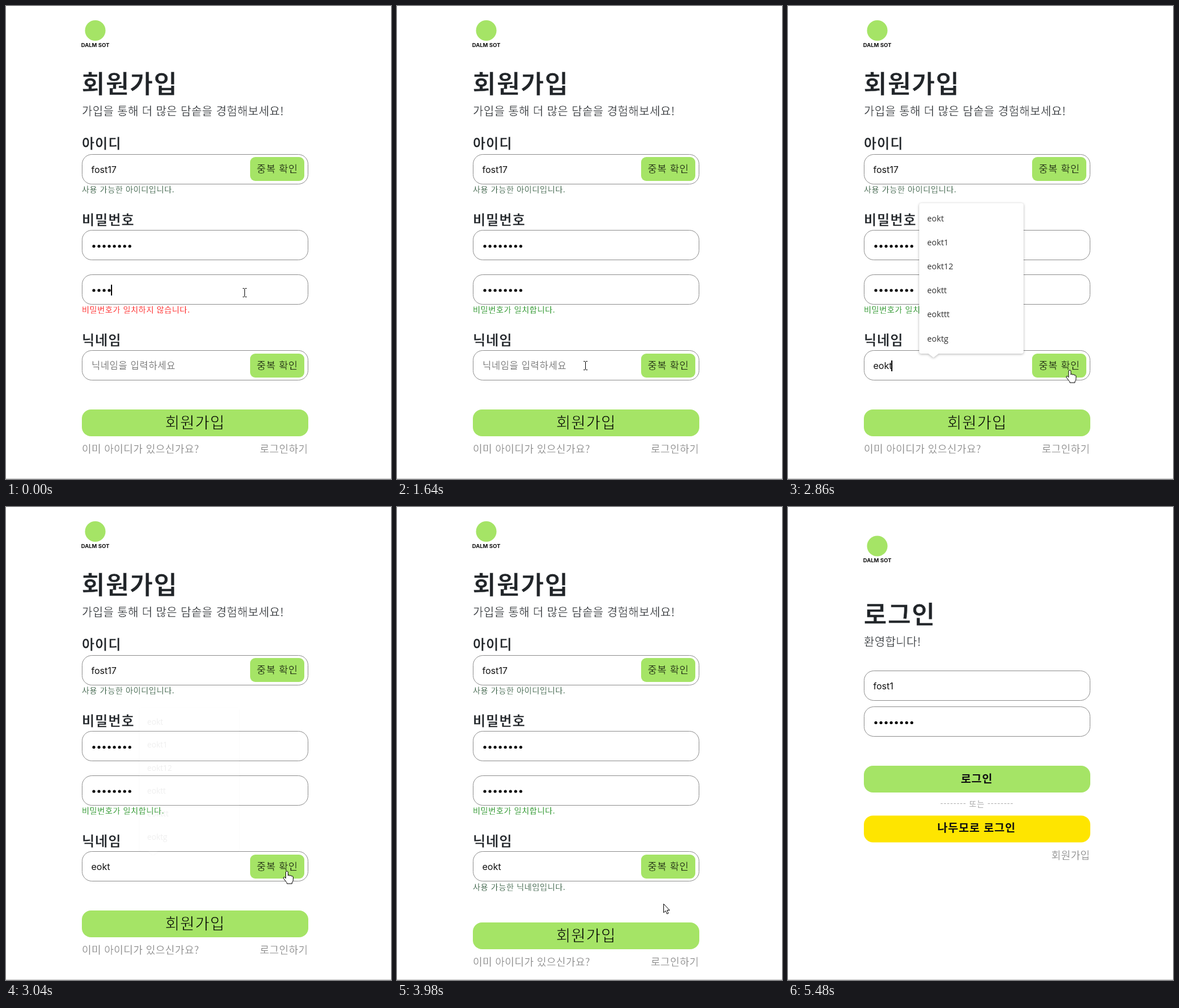
Write an HTML page that moves like this. It is 675x830 px and loops after 5680 ms.

```html
<!DOCTYPE html>
<html lang="ko">
<head>
<meta charset="utf-8">
<title>회원가입</title>
<style>
  html, body { margin: 0; width: 100%; height: 100%; overflow: hidden; background: #fff; }
  svg { display: block; width: 675px; height: 830px; }
  text { font-family: "Noto Sans CJK KR", "Noto Sans CJK JP", sans-serif; fill: #212529; }
  /* A stroke in the background colour thins the glyphs to a lighter weight. */
  .title, .label, .lead, .note, .hint, .link { stroke: #fff; stroke-width: .4px; }
  .check, .join { stroke: #a5e466; stroke-width: .4px; }
  .title { font-size: 44.5px; font-weight: 700; letter-spacing: 1.2px; stroke-width: .6px; }
  .lead { font-size: 20px; font-weight: 300; letter-spacing: .3px; }
  .label { font-size: 24px; font-weight: 700; letter-spacing: 1px; }
  .box { fill: #fff; stroke: #8c8c8c; }
  .green { fill: #a5e466; }
  .yellow { fill: #fee500; }
  .check { font-size: 17.5px; letter-spacing: .6px; fill: #000; }
  .value { font-family: Inter, "Noto Sans", sans-serif; font-size: 16px; fill: #111; }
  .hint { font-size: 16.5px; font-weight: 300; letter-spacing: .6px; fill: #757575; stroke-width: .2px; }
  .note { font-size: 14.2px; font-weight: 300; letter-spacing: .5px; fill: #1e4a2c; stroke-width: .25px; }
  .join { font-size: 27.5px; letter-spacing: 1px; fill: #000; stroke-width: .7px; }
  .link { font-size: 18px; font-weight: 300; letter-spacing: .35px; fill: #888; stroke-width: .25px; }
  .enter { font-size: 19.5px; font-weight: 600; letter-spacing: .8px; fill: #111; }
  .or { font-size: 14px; font-weight: 300; letter-spacing: .85px; fill: #aaa; }
  .brand { font-family: Inter, sans-serif; font-size: 9.5px; font-weight: 700; fill: #111; }
  .mid { text-anchor: middle; }
  .end { text-anchor: end; }
  .dots { fill: none; stroke: #000; stroke-width: 5.2; stroke-linecap: round; stroke-dasharray: 0 9; }
  .caret { fill: #000; }
  #popup { transform-origin: 321.5px 478px; }
  #popup path { fill: #fff; filter: drop-shadow(0 1px 2px rgba(0, 0, 0, .3)); }
  #popup text { font-family: "Open Sans", "Noto Sans", sans-serif; font-size: 14.3px; fill: #333; }
  #cursor path { fill: #fff; stroke: #000; stroke-linejoin: round; }
  #cursor #ibeam { fill: none; }
</style>
</head>
<body>
<svg viewBox="0 0 675 830">
  <defs>
    <rect id="field" class="box" x="133.5" width="396" height="52" rx="17"/>
    <rect id="bar" x="133" width="397" height="47" rx="16"/>
    <g id="check">
      <rect class="green" x="428" width="95" height="42" rx="9"/>
      <text class="check" x="439.5" y="27">중복 확인</text>
    </g>
    <g id="logo">
      <circle class="green" cx="156.5" cy="43" r="18"/>
      <text class="brand mid" x="156.5" y="71.5">DALM SOT</text>
    </g>
  </defs>

  <g id="signup">
    <use href="#logo"/>
    <text class="title" x="132.5" y="153">회원가입</text>
    <text class="lead" x="133" y="192">가입을 통해 더 많은 담솥을 경험해보세요!</text>

    <text class="label" x="133" y="250">아이디</text>
    <use href="#field" y="260.5"/>
    <text class="value" x="149.5" y="292.5">fost17</text>
    <use href="#check" y="265"/>
    <text class="note" x="133" y="327">사용 가능한 아이디입니다.</text>

    <text class="label" x="133" y="384">비밀번호</text>
    <use href="#field" y="393.5"/>
    <path class="dots" d="M154 421.5h63.1"/>
    <use href="#field" y="471.5"/>
    <path class="dots" id="repeat"/>
    <rect class="caret" id="pwCaret" y="489" width="2" height="19"/>
    <text class="note" id="match" x="133" y="538"></text>

    <text class="label" x="133" y="595">닉네임</text>
    <use href="#field" y="604.5"/>
    <text class="hint" id="hint" x="150" y="637.2">닉네임을 입력하세요</text>
    <text class="value" id="nick" x="149.5" y="637"></text>
    <rect class="caret" id="nickCaret" y="622" width="2" height="19"/>
    <use href="#check" y="610"/>
    <text class="note" id="nickOk" x="133" y="671.5">사용 가능한 닉네임입니다.</text>

    <g id="foot">
      <use href="#bar" class="green" y="708"/>
      <text class="join mid" x="331.5" y="741">회원가입</text>
      <text class="link" x="133" y="784.4">이미 아이디가 있으신가요?</text>
      <text class="link end" x="529.5" y="784.4">로그인하기</text>
    </g>

    <g id="popup">
      <path d="M234 346H409a4 4 0 0 1 4 4V606a4 4 0 0 1-4 4H264l-9 7-9-7H234a4 4 0 0 1-4-4V350a4 4 0 0 1 4-4Z"/>
    </g>
  </g>

  <g id="login">
    <use href="#logo" y="25.5"/>
    <text class="title" x="132.5" y="205">로그인</text>
    <text class="lead" x="133" y="243.7">환영합니다!</text>
    <use href="#field" y="287.5"/>
    <text class="value" x="149.5" y="319.5">fost1</text>
    <use href="#field" y="350.5"/>
    <path class="dots" d="M154 378.5h63.1"/>
    <use href="#bar" class="green" y="454"/>
    <text class="enter mid" x="331" y="484.4">로그인</text>
    <text class="or mid" x="331.3" y="525.8">-------- 또는 --------</text>
    <use href="#bar" class="yellow" y="541.4"/>
    <text class="enter mid" x="330.5" y="570.4">나두모로 로그인</text>
    <text class="link end" x="529.5" y="617.6">회원가입</text>
  </g>

  <g id="cursor">
    <path id="ibeam" d="M-3.5-7.5h2.5l1 1 1-1h2.5M0-6.5V6.5M-3.5 7.5h2.5l1-1 1 1h2.5"/>
    <path id="arrow" d="M.5.5V15.8L4 12.6 6.3 18 8.8 17 6.5 11.6H11Z"/>
    <path id="hand" d="M-2 2Q-2 0 0 0T2 2V8Q2 6.8 3.6 6.8T5.2 8.4Q5.4 7.6 6.8 7.6T8.4 9.2Q8.8 8.6 9.8 8.8T11 11V15Q11 18 9 20V22H0V20.5L-5 14Q-7 11.5-5.5 10.6T-2 12.5Z"/>
  </g>

  <path d="M0 829.5H675" stroke="#c4c4c4"/>
</svg>
<script>
  const LOOP = 5680;
  const $ = id => document.getElementById(id);
  const show = (id, on) => { $(id).style.display = on ? '' : 'none'; };

  // Each track holds [start ms, ...values]; the latest started entry applies.
  const pick = (track, t) => track.reduce((now, row) => t >= row[0] ? row : now);

  const dots = [[0, 4], [330, 5], [430, 6], [530, 7], [810, 8]];
  const nick = [[0, ''], [2090, 'e'], [2320, 'eo'], [2380, 'eok'], [2660, 'eokt']];
  const lists = [
    [0, 'ee', 'eokt', 'e', 'eoeo', 'eokt1', 'eokt12'],
    [2320, 'eokt', 'eoeo', 'eokt1', 'eokt12', 'eoktt', 'eoktg'],
    [2380, 'eokt', 'eokt1', 'eokt12', 'eoktt', 'eokttt', 'eoktg']
  ];
  // opacity, scale
  const popup = [
    [0, 0, 1], [2170, .6, .98], [2250, 1, 1], [2920, .8, .99],
    [2980, .4, .97], [3040, .07, .955], [3110, 0, 1]
  ];
  const cursor = [
    [0, 'ibeam', 418.5, 503], [1150, 'ibeam', 428.5, 496], [1200, 'ibeam', 438.5, 492],
    [1340, 'ibeam', 437.5, 497], [1400, 'ibeam', 428.5, 512], [1460, 'arrow', 405, 545],
    [1520, 'arrow', 372, 583], [1580, 'ibeam', 344.5, 620], [1640, 'ibeam', 330.5, 631],
    [1940, 'ibeam', 352.5, 630], [2010, 'ibeam', 395.5, 632], [2090, 'hand', 450, 635],
    [2170, 'hand', 500, 637.5], [2250, 'hand', 507.5, 638.5], [2440, 'hand', 500, 638.5],
    [2510, 'hand', 494, 639], [3040, 'hand', 492.5, 639], [3260, 'hand', 497, 640],
    [3325, 'hand', 507, 642], [3390, 'arrow', 526, 646], [3455, 'arrow', 538, 650],
    [3520, 'arrow', 545, 655], [3585, 'arrow', 547, 660], [3650, 'arrow', 547, 664],
    [3780, 'arrow', 546, 668], [3850, 'arrow', 537, 672], [3915, 'arrow', 505, 688],
    [3980, 'arrow', 467, 696], [4050, 'arrow', 443, 706], [4120, 'arrow', 424, 718],
    [4190, 'hand', 410, 732], [4250, 'hand', 404, 737], [4320, 'hand', 400, 738],
    [4600, 'hand', 404, 738], [4670, 'none', 0, 0]
  ];

  const rows = Array.from({ length: 6 }, (_, i) => {
    const row = document.createElementNS('http://www.w3.org/2000/svg', 'text');
    row.setAttribute('x', 244);
    row.setAttribute('y', 377.5 + i * 42.2);
    return $('popup').appendChild(row);
  });

  function draw(t) {
    show('signup', t < 5480);
    show('login', t >= 5480);

    const count = pick(dots, t)[1];
    $('repeat').setAttribute('d', `M154 499h${(count - 1) * 9 + .1}`);
    $('pwCaret').setAttribute('x', 148 + count * 9);
    show('pwCaret', t < 1340);
    const same = count === 8;
    $('match').textContent = same ? '비밀번호가 일치합니다.' : '비밀번호가 일치하지 않습니다.';
    $('match').style.fill = same ? '#008000' : '#f00';

    const name = pick(nick, t)[1];
    $('nick').textContent = name;
    show('hint', !name);
    show('nickCaret', t >= 1780 && t < 2920);
    if (t < 5480) $('nickCaret').setAttribute('x', Math.floor(149 + $('nick').getComputedTextLength()));

    const accepted = t >= 3325;
    show('nickOk', accepted);
    $('foot').setAttribute('transform', `translate(0 ${accepted ? 21 : 0})`);

    const [, alpha, scale] = pick(popup, t);
    show('popup', alpha > 0);
    $('popup').style.opacity = alpha;
    $('popup').style.transform = `scale(${scale})`;
    const list = pick(lists, t);
    rows.forEach((row, i) => { row.textContent = list[i + 1]; });

    const [, kind, x, y] = pick(cursor, t);
    $('cursor').setAttribute('transform', `translate(${x} ${y})`);
    for (const id of ['ibeam', 'arrow', 'hand']) show(id, id === kind);
  }

  const start = performance.now();
  function tick() {
    draw((performance.now() - start) % LOOP);
    requestAnimationFrame(tick);
  }
  tick();
</script>
</body>
</html>
```
